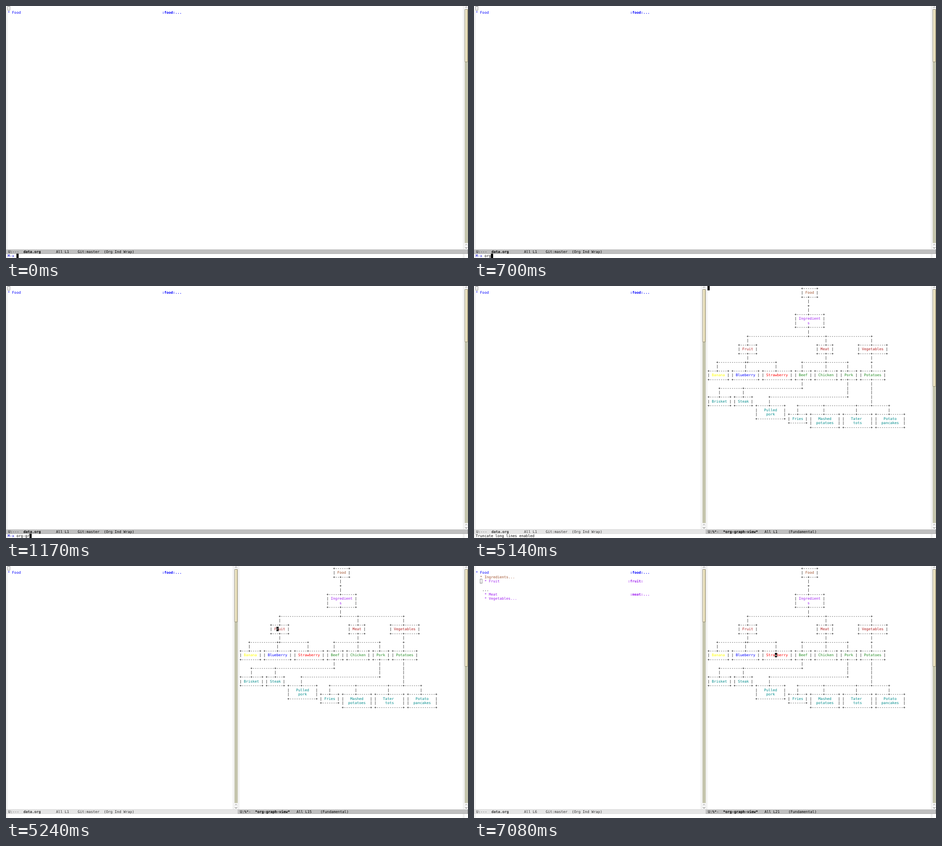
An HTML page for the animation above (8 s loop, 1013 by 553 pixels).

```html
<!DOCTYPE html>
<html lang="en">
<head>
<meta charset="utf-8">
<title>Org graph view</title>
<style>
  html, body { margin: 0; width: 100%; height: 100%; overflow: hidden; background: #fff; }
  svg { display: block; width: 100vw; height: 100vh; }
  text {
    font: 16.61px "DejaVu Sans Mono", monospace;
    white-space: pre;
    text-rendering: geometricPrecision;
  }
  .b { font-weight: bold; }
</style>
</head>
<body>
<svg id="stage" viewBox="0 0 2125 1160" preserveAspectRatio="none">
  <defs>
    <linearGradient id="thumb">
      <stop offset="0" stop-color="#f7f1dc"/>
      <stop offset="1" stop-color="#dfd3a6"/>
    </linearGradient>
  </defs>
  <g id="screen"></g>
</svg>
<script>
// Editor screen in its own pixels: character cells of 10 x 20.
const W = 2125, CW = 10, LH = 20, BASE = 16;
const BAR_Y = 1120, ECHO_Y = 1140;
const LEFT = 8, RIGHT = 1074, SPLIT = 1066;
const BLUE = '#0000ff', SIENNA = '#a0522d', PURPLE = '#a020f0', BRICK = '#b22222',
      GREEN = '#228b22', CYAN = '#008b8b', YELLOW = '#ffff00', RED = '#ff0000';

const rect = (x, y, w, h, fill, more = '') =>
  `<rect x="${x}" y="${y}" width="${w}" height="${h}" fill="${fill}" ${more}/>`;
const textAt = (x, y, s, fill = '#000', bold = false) =>
  `<text xml:space="preserve" x="${x}" y="${y + BASE}" fill="${fill}"${bold ? ' class="b"' : ''}>${s}</text>`;
const cell = (x0, row, col, s, fill, bold) => textAt(x0 + col * CW, row * LH, s, fill, bold);

const block = (x0, row, col, char = '') =>
  rect(x0 + col * CW, row * LH, CW, LH, '#000') + cell(x0, row, col, char, '#fff');
const hollow = (x0, row, col) =>
  rect(x0 + col * CW + .5, row * LH + .5, CW - 1, LH - 1, 'none', 'stroke="#000"');

// ---- window parts ----
function chevron(x, y, dir, color) {
  return `<path d="M${x - 5} ${y + 2.5 * dir}l5 ${-5 * dir}l5 ${5 * dir}" fill="none" stroke="${color}" stroke-width="1.8"/>`;
}

function scrollbar(x, end) {
  return rect(x, 0, 16, BAR_Y, '#f7f7f7') +
    rect(x + 1.5, 15.5, 14, 1075, '#c5c5ad', 'stroke="#b0b09a"') +
    rect(x + 1.5, 15.5, 13, end - 15, 'url(#thumb)', 'rx="2" stroke="#6e6a55" stroke-width="1.5"') +
    chevron(x + 8, 6, 1, '#666') + chevron(x + 8, 1099, 1, '#777') + chevron(x + 8, 1113, -1, '#222');
}

function frame(x, end, thumbEnd) {
  return rect(x, 0, 8, BAR_Y, '#f2f2f2') + rect(end - 24, 0, 8, BAR_Y, '#f2f2f2') +
    scrollbar(end - 16, thumbEnd);
}

function modeline(x, end, active, flags, name, rest) {
  const w = end - x, ink = active ? '#000' : '#333';
  const bar = active
    ? rect(x, BAR_Y, w, LH, '#bfbfbf') + rect(x, BAR_Y, w, 1, '#d9d9d9') +
      rect(x, ECHO_Y - 1, w, 1, '#6b6b6b') + rect(end - 1, BAR_Y, 1, LH, '#6b6b6b')
    : rect(x, BAR_Y, w, LH, '#e5e5e5') +
      rect(x + .5, BAR_Y + .5, w - 1, LH - 1, 'none', 'stroke="#bfbfbf"');
  const at = (col, s, bold) => textAt(x + (col + 1) * CW, BAR_Y, s, ink, bold);
  return bar + at(0, flags) + at(7, name, true) + rest.map(([c, s]) => at(c, s)).join('');
}

const echoFringes = rect(0, ECHO_Y, 8, LH, '#f2f2f2') + rect(W - 24, ECHO_Y, 8, LH, '#f2f2f2');

// ---- outline buffer ----
const foodLine = cell(LEFT, 1, 0, '* Food', BLUE) + cell(LEFT, 1, 71, ':food:...', BLUE, true);
const openTree = foodLine +
  cell(LEFT, 2, 2, '* Ingredients...', SIENNA) +
  cell(LEFT, 3, 4, '* Fruit', PURPLE) + cell(LEFT, 3, 70, ':fruit:', PURPLE, true) +
  cell(LEFT, 5, 3, '...') +
  cell(LEFT, 6, 4, '* Meat', PURPLE) + cell(LEFT, 6, 71, ':meat:...', PURPLE, true) +
  cell(LEFT, 7, 4, '* Vegetables...', PURPLE);

function outline(end, body, active, line) {
  return frame(0, end, 257) + body +
    modeline(0, end, active, 'U:---', 'data.org',
      [[22, 'All L' + line], [32, 'Git:master'], [44, '(Org Ind Wrap)']]);
}

// ---- graph buffer ----
const grid = Array.from({ length: 33 }, () => Array(92).fill(' '));
let labels = '';

const put = (row, col, s) => [...s].forEach((c, i) => grid[row][col + i] = c);
const stems = (row, ...cols) => cols.forEach(c => put(row, c, '|'));

// Horizontal rule from the first to the last joint.
function rule(row, ...joints) {
  const a = joints[0], b = joints[joints.length - 1];
  put(row, a, '-'.repeat(b - a + 1));
  joints.forEach(c => put(row, c, '+'));
}

// Box with an optional joint on its top and bottom edges; lines are [column, text].
function box(row, col, width, top, bottom, color, ...lines) {
  const end = col + width - 1, bottomRow = row + lines.length + 1;
  const edge = (r, joint) => rule(r, ...(joint === null ? [col, end] : [col, joint, end]));
  edge(row, top);
  edge(bottomRow, bottom);
  lines.forEach(([c, s], i) => {
    stems(row + 1 + i, col, end);
    labels += cell(RIGHT, row + 1 + i, c, s, color);
  });
}

// One-line box sized by its label.
const leaf = (row, col, top, bottom, color, s) =>
  box(row, col, s.length + 4, top, bottom, color, [col + 2, s]);

leaf(0, 43, null, 46, SIENNA, 'Food');
stems(3, 46); put(4, 46, '+'); stems(5, 46);
box(6, 40, 14, 46, 46, PURPLE, [42, 'Ingredient'], [46, 's']);
stems(10, 46);
rule(11, 18, 46, 54, 75);
stems(12, 18, 54, 75);
leaf(13, 14, 18, 18, BRICK, 'Fruit');
leaf(13, 50, 54, 54, BRICK, 'Meat');
leaf(13, 69, 75, 75, BRICK, 'Vegetables');
stems(16, 18, 54, 75);
rule(17, 4, 17, 18, 31);
rule(17, 43, 54, 64);
put(17, 75, '+');
stems(18, 4, 17, 31, 43, 54, 64, 75);
leaf(19, 0, 4, null, YELLOW, 'Banana');
leaf(19, 11, 17, null, BLUE, 'Blueberry');
leaf(19, 25, 31, null, RED, 'Strawberry');
leaf(19, 40, 43, 43, GREEN, 'Beef');
leaf(19, 49, 54, null, GREEN, 'Chicken');
leaf(19, 61, 64, 64, GREEN, 'Pork');
leaf(19, 70, 75, 75, GREEN, 'Potatoes');
stems(22, 43, 64, 75);
rule(23, 5, 16, 43);
stems(23, 64, 75);
stems(24, 5, 16, 64, 75);
leaf(25, 0, 5, null, CYAN, 'Brisket');
leaf(25, 12, 16, null, CYAN, 'Steak');
rule(25, 28, 64);
stems(25, 75);
stems(26, 28, 75);
box(27, 22, 14, 28, null, CYAN, [26, 'Pulled'], [27, 'pork']);
rule(27, 41, 53, 68, 75, 83);
stems(28, 41, 53, 68, 83);
leaf(29, 37, 41, null, CYAN, 'Fries');
box(29, 47, 14, 53, null, CYAN, [51, 'Mashed'], [50, 'potatoes']);
box(29, 62, 14, 68, null, CYAN, [66, 'Tater'], [67, 'tots']);
box(29, 77, 14, 83, null, CYAN, [81, 'Potato'], [80, 'pancakes']);

const graphBody = grid.map((r, i) => cell(RIGHT, i, 0, r.join('').trimEnd())).join('') + labels;

function graph(active, line, cursor) {
  return frame(SPLIT, W, 462) + graphBody + cursor +
    modeline(SPLIT, W, active, 'U:%*-', '*org-graph-view*',
      [[26, 'All L' + line], [37, '(Fundamental)']]);
}

// ---- scenes ----
const home = foodLine + hollow(LEFT, 0, 0);

const prompt = typed => echoFringes + outline(W, home, true, 1) +
  textAt(LEFT, ECHO_Y, 'M-x', '#0000cd') + textAt(LEFT + 4 * CW, ECHO_Y, typed) +
  block(LEFT, ECHO_Y / LH, 4 + typed.length);

const split = (left, right, echo = '') => echoFringes + left + right + textAt(LEFT, ECHO_Y, echo);

const command = 'org-graph-view';
const typing = [[0, 0], [500, 1], [600, 2], [700, 3], [820, 4], [900, 5], [1170, 6], [1680, 14]];

const scenes = [
  ...typing.map(([t, n]) => [t, prompt(command.slice(0, n))]),
  [5140, split(outline(SPLIT, home, false, 1), graph(true, 1, block(RIGHT, 0, 0)),
    'Truncate long lines enabled')],
  [5240, split(outline(SPLIT, home, false, 1), graph(true, 15, block(RIGHT, 14, 17, 'r')))],
  [6990, split(outline(SPLIT, openTree, true, 6), graph(false, 15, hollow(RIGHT, 14, 17)))],
  [7080, split(outline(SPLIT, openTree + hollow(LEFT, 3, 2), false, 6),
    graph(true, 21, block(RIGHT, 20, 31, 'w')))]
];

const LOOP = 8000, screenEl = document.getElementById('screen');
const start = performance.now();
let shown = -1;

function tick() {
  const t = (performance.now() - start) % LOOP;
  const now = scenes.findLastIndex(([at]) => at <= t);
  if (now !== shown) {
    screenEl.innerHTML = scenes[now][1];
    shown = now;
  }
  requestAnimationFrame(tick);
}
tick();
</script>
</body>
</html>
```
